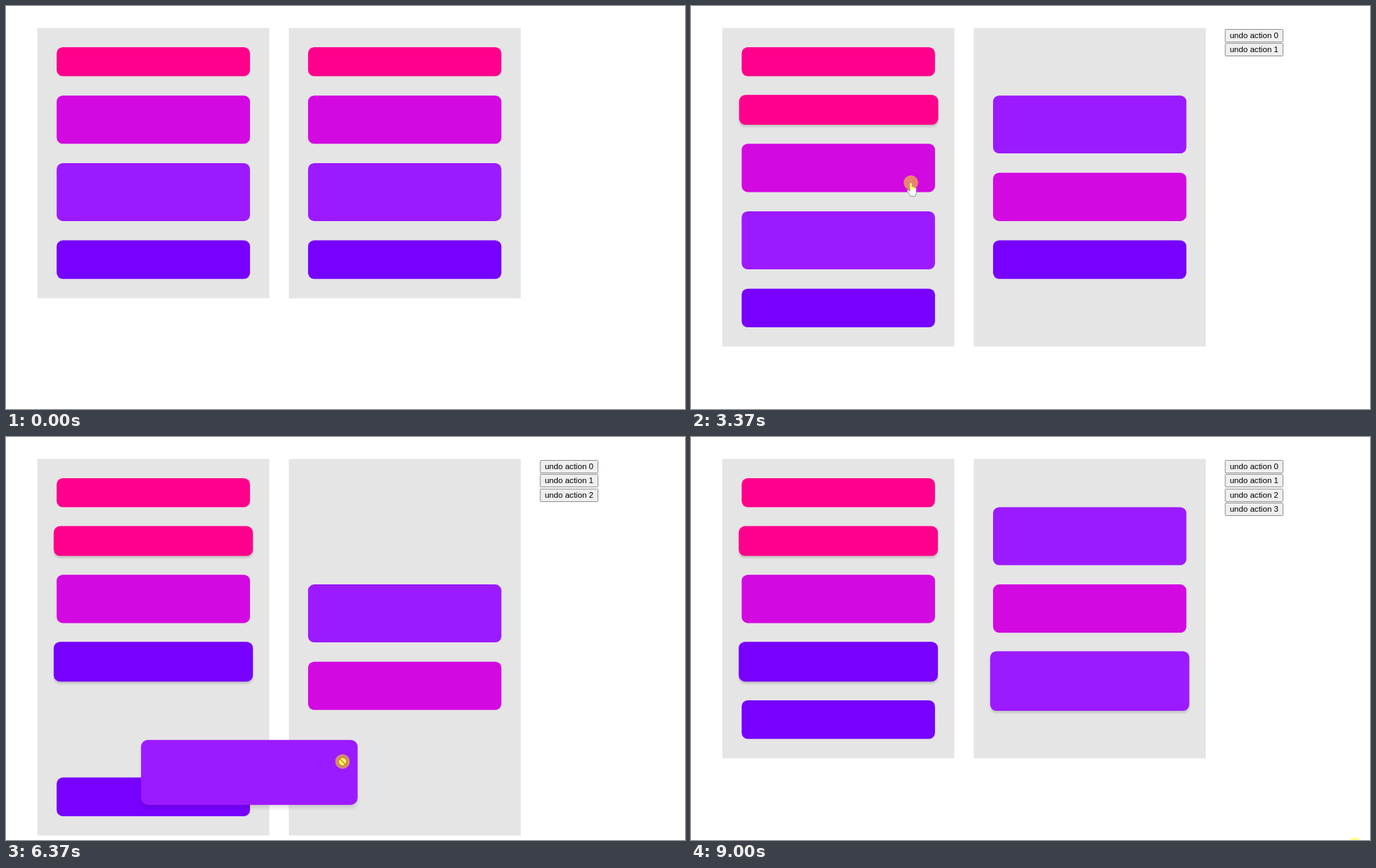
An HTML page with a canvas for the animation above (9.08 s loop, 971 by 577 pixels).

```html
<!DOCTYPE html>
<html lang="en">
<head>
<meta charset="utf-8">
<title>Drag between lists</title>
<style>
html, body { margin: 0; width: 971px; height: 577px; overflow: hidden; background: #fff; }
canvas { display: block; }
</style>
</head>
<body>
<canvas id="stage" width="971" height="577"></canvas>
<script>
const ctx = document.getElementById('stage').getContext('2d');
const LOOP = 9080, U = 0.6912, TOP = 31.4, LEFT = [44.8, 404.3], GAP = 40;
const COLORS = ['#ff008c', '#d309e1', '#9c1aff', '#7700ff'];
const HEIGHTS = [60, 100, 120, 80];
const IDS = 'abcdefgh';
const kind = id => IDS.indexOf(id) % 4;

// Each drag reorders the lists at "drop"; "moved" means into the other list
const drags = [
  { id: 'g', press: 930, drop: 1134, release: 1370, lists: ['abcd', 'egfh'] },
  { id: 'e', press: 2060, drop: 2541, release: 2860, lists: ['aebcd', 'gfh'], moved: true },
  { id: 'h', press: 4200, drop: 4600, release: 4950, lists: ['aebhcd', 'gf'], moved: true },
  { id: 'c', press: 5760, drop: 6465, release: 7100, lists: ['aebhd', 'gfc'], moved: true }
];

// Pointer stops: time, x, y
const path = [
  [70, 823, 474], [620, 613, 250], [930, 613, 245], [1370, 616, 168], [1380, 616, 119],
  [2060, 600, 88], [2610, 315, 126], [2860, 252, 152], [3440, 317, 256], [3830, 317, 256],
  [4200, 490, 348], [4530, 272, 301], [4950, 194, 294], [5220, 332, 293], [5760, 344, 403],
  [6600, 555, 472], [6840, 649, 427], [7100, 694, 355], [7530, 697, 345],
  [8300, 949, 600], [8999, 949, 600], [9000, 949, 584]
];

const mix = (a, b, p) => a + (b - a) * p;
const clamp = v => Math.min(1, Math.max(0, v));

function layout(start, lists) {
  const sums = lists.map(l => [...l].reduce((s, id) => s + HEIGHTS[kind(id)] + GAP, GAP));
  const height = Math.max(...sums), slots = {};
  lists.forEach((list, i) => {
    let y = (height - sums[i]) / 2 + GAP;
    for (const id of list) {
      const h = HEIGHTS[kind(id)];
      slots[id] = { x: LEFT[i] + 240 * U, y: TOP + (y + h / 2) * U };
      y += h + GAP;
    }
  });
  return { start, height, slots };
}
const layouts = [layout(0, ['abcd', 'efgh']), ...drags.map(d => layout(d.drop, d.lists))];
const layoutAt = t => layouts.filter(l => l.start <= t).pop();

// cubic-bezier(.4, 0, .1, 1)
function ease(x) {
  let lo = 0, hi = 1, s = 0.5;
  for (let i = 0; i < 20; i++) {
    s = (lo + hi) / 2;
    if (1.2 * s * (1 - s) ** 2 + 0.3 * s * s * (1 - s) + s ** 3 < x) lo = s; else hi = s;
  }
  return s * s * (3 - 2 * s);
}

// Monotone cubic through the stops
function slope(i, c) {
  const a = path[i - 1], b = path[i], d = path[i + 1];
  if (!a || !d || (b[c] - a[c]) * (d[c] - b[c]) <= 0) return 0;
  const before = (b[c] - a[c]) / (b[0] - a[0]), after = (d[c] - b[c]) / (d[0] - b[0]);
  return 2 * before * after / (before + after);
}

function pointer(t) {
  let i = 0;
  while (i < path.length - 2 && path[i + 1][0] <= t) i++;
  const a = path[i], b = path[i + 1], span = b[0] - a[0], p = clamp((t - a[0]) / span);
  const [x, y] = [1, 2].map(c =>
    mix(a[c], b[c], p * p * (3 - 2 * p)) +
    span * p * (1 - p) * (slope(i, c) * (1 - p) - slope(i + 1, c) * p));
  return { x, y };
}

function slotAt(id, t) {
  const now = layoutAt(t), prev = layouts[layouts.indexOf(now) - 1] || now;
  const p = ease(clamp((t - now.start) / 450)), a = prev.slots[id], b = now.slots[id];
  return { x: mix(a.x, b.x, p), y: mix(a.y, b.y, p) };
}

const activeDrag = (id, t) => drags.find(d => d.id === id && t >= d.press && t < d.release + 800);

function place(id, t) {
  const drag = activeDrag(id, t);
  if (!drag) return slotAt(id, t);
  const from = slotAt(id, drag.press), grab = pointer(drag.press);
  const hand = pointer(Math.min(t, drag.release));
  const held = { x: from.x + hand.x - grab.x, y: from.y + hand.y - grab.y };
  if (t < drag.release) return held;
  const home = layoutAt(t).slots[id], p = 1 - Math.exp((drag.release - t) / 160);
  return { x: mix(held.x, home.x, p), y: mix(held.y, home.y, p) };
}

// Grows on hover and again on press; stays hovered after a change of list
function scaleAt(id, t) {
  const drag = drags.find(d => d.id === id);
  if (!drag) return 1;
  const { press, drop, release, moved } = drag;
  const step = (start, by) => t < start ? 0 : by * (1 - Math.exp((start - t) / 35));
  return 1 + step(press - 200, 0.03) + step(press, 0.09) +
    (moved ? step(drop, -0.09) : step(release + 60, -0.12));
}

function boxAt(id, t) {
  const { x, y } = place(id, t), s = scaleAt(id, t);
  const w = 400 * U * s, h = HEIGHTS[kind(id)] * U * s;
  return { x: x - w / 2, y: y - h / 2, w, h, s };
}

function drawItem(id, t) {
  const { x, y, w, h, s } = boxAt(id, t);
  const hover = clamp((s - 1) / 0.03), tap = clamp((s - 1.03) / 0.09);
  ctx.save();
  ctx.shadowColor = `rgba(0,0,0,${mix(0.15, 0.1, tap) * hover})`;
  ctx.shadowOffsetY = ctx.shadowBlur = 3 * hover + 2 * tap;
  ctx.fillStyle = COLORS[kind(id)];
  ctx.beginPath();
  ctx.roundRect(x, y, w, h, 8.7 * s);
  ctx.fill();
  ctx.restore();
}

function drawButton(i) {
  const y = 33.5 + Math.round(i * 20.3);
  ctx.fillStyle = '#efefef';
  ctx.strokeStyle = '#8c8c8c';
  ctx.lineWidth = 1;
  ctx.beginPath();
  ctx.roundRect(764, y, 82.5, 18, 1);
  ctx.fill();
  ctx.stroke();
  ctx.fillStyle = '#000';
  ctx.font = '11.6px "Liberation Sans", Arial, sans-serif';
  ctx.textAlign = 'center';
  ctx.fillText('undo action ' + i, 805.2, y + 12.9);
}

const shapes = {
  arrow: new Path2D('M0 0V14L3.3 11L5.6 16L7.8 15L5.6 10.2H10Z'),
  hand: new Path2D('M-1.7 1.3Q0 -1 1.5 1.3V6Q3.2 5 4 6.6Q5.5 6 6.2 7.4Q8 7 8 9V14Q7.6 17 5.8 19.5H-.8Q-1.7 16.5 -4.3 13.7Q-6.6 10.8 -5.2 10Q-3.8 9.5 -1.7 12Z'),
  no: new Path2D('M6 0A6 6 0 1 1 -6 0A6 6 0 1 1 6 0M-4.2 -4.2L4.2 4.2')
};

function pointerShape(t, p) {
  if (drags.some(d => d.moved && Math.abs(t - d.drop) < 150)) return 'no';
  const over = [...IDS].some(id => {
    const b = boxAt(id, t);
    return p.x > b.x && p.x < b.x + b.w && p.y > b.y && p.y < b.y + b.h;
  });
  return over ? 'hand' : 'arrow';
}

function drawPointer(t) {
  const p = pointer(t), shape = pointerShape(t, p);
  const blink = [3600, 5200].some(start => t >= start && t < start + 100);
  ctx.save();
  ctx.translate(p.x, p.y);
  ctx.fillStyle = '#fff';
  ctx.strokeStyle = shape === 'no' ? '#d80000' : '#333';
  ctx.lineWidth = { no: 1.6, arrow: 0.8, hand: 0.5 }[shape];
  ctx.fill(shapes[shape]);
  ctx.stroke(shapes[shape]);
  if (!blink) {
    ctx.fillStyle = 'rgba(255,255,0,.5)';
    ctx.beginPath();
    ctx.arc(0, 0, 10.4, 0, 7);
    ctx.fill();
  }
  ctx.restore();
}

function draw(t) {
  ctx.fillStyle = '#fff';
  ctx.fillRect(0, 0, 971, 577);
  ctx.fillStyle = '#e5e5e5';
  for (const x of LEFT) ctx.fillRect(x, TOP, 480 * U, layoutAt(t).height * U);
  const held = id => activeDrag(id, t) ? 1 : 0;
  [...IDS].sort((a, b) => held(a) - held(b)).forEach(id => drawItem(id, t));
  drags.forEach((d, i) => { if (t >= d.release + 40) drawButton(i); });
  if (t >= path[0][0]) drawPointer(t);
}

function frame() {
  draw(performance.now() % LOOP);
  requestAnimationFrame(frame);
}
frame();
</script>
</body>
</html>
```
